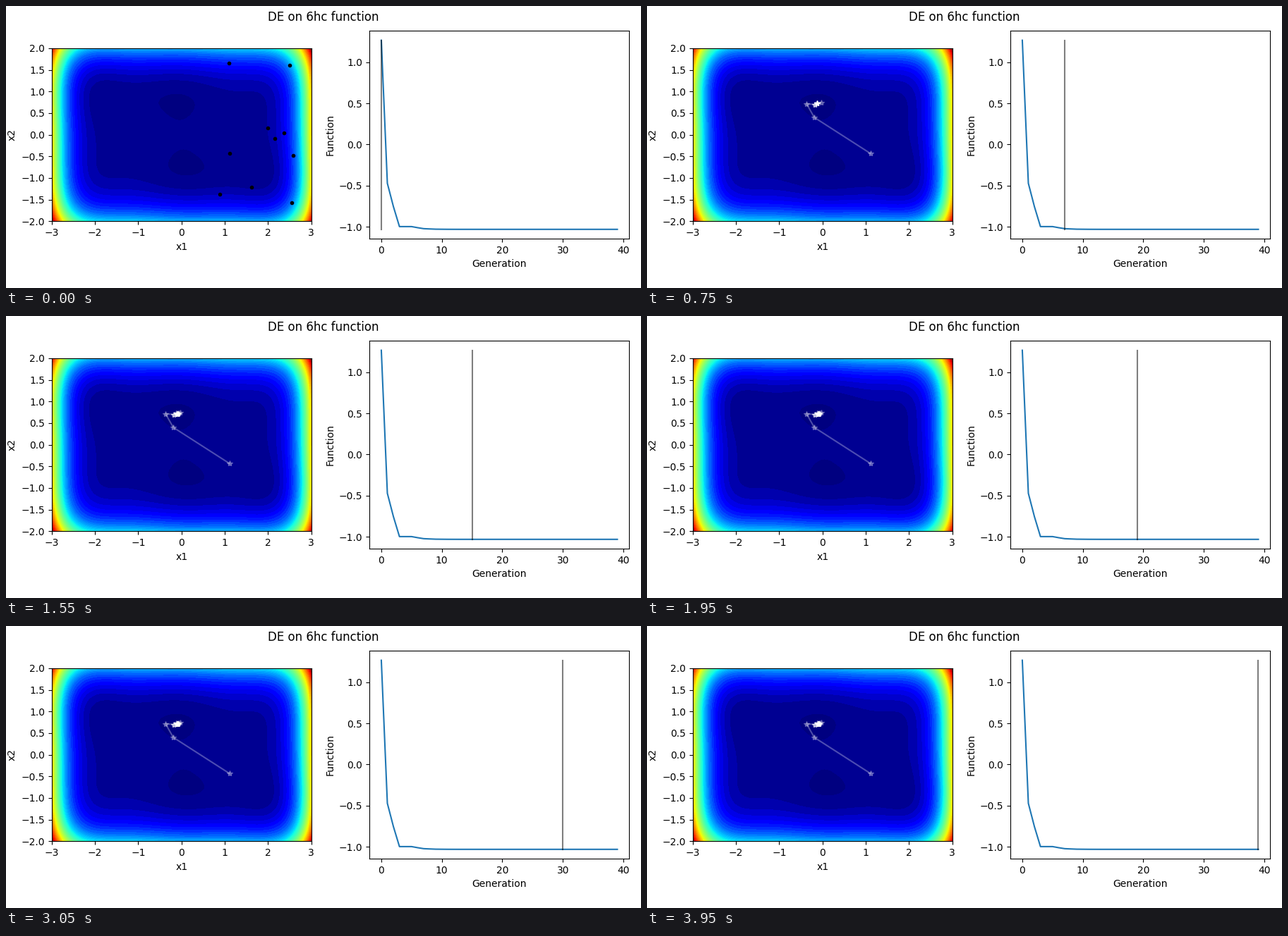
A matplotlib script for the animation above (4000 ms loop, 900 by 400 pixels).

```python
import numpy as np
import matplotlib.pyplot as plt
from matplotlib.animation import FuncAnimation
from matplotlib.colors import Normalize

W, H = 900, 400
GENS, SIZE = 40, 10
OPTIMUM = np.array([-0.0898, 0.7126])


def camel(x, y):
    return (4 - 2.1 * x**2 + x**4 / 3) * x**2 + x * y + (4 * y**2 - 4) * y**2


def best_points():
    """A few big jumps, a short rest, then a damped swing into the optimum."""
    jumps = [(1.11, -0.435), (-0.19, 0.40), (-0.37, 0.715)]
    rest = [(-0.18, 0.70)] * 3
    k = np.arange(GENS - len(jumps) - len(rest))
    swing = np.column_stack([0.055 * (-0.7) ** k, 0.028 * 0.7 ** k])
    return np.vstack([jumps, rest, OPTIMUM + swing])


best = best_points()
score = camel(*best.T)


def evolve():
    """Greedy search: a trial replaces a member only when it scores lower."""
    rng = np.random.default_rng(4)
    pool = rng.uniform(-1, 1, (8 * SIZE, 2)) * (2.67, 1.87)
    pool = pool[camel(*pool.T) > score[0]]
    pops = [np.vstack([best[:1], pool[:SIZE - 1]])]
    for g in range(1, GENS):
        pop = pops[-1].copy()
        reach = np.exp(-0.36 * g) * np.array([2.4, 0.8])
        trial = best[g] + reach * rng.uniform(-1, 1, pop.shape)
        new = camel(*trial.T)
        better = (new < camel(*pop.T)) & (new >= score[g])
        pop[better] = trial[better]
        pop[0] = best[g]
        pops.append(pop)
    return pops


pops = evolve()

fig = plt.figure(figsize=(W / 100, H / 100), dpi=100)
fig.suptitle("DE on 6hc function", y=0.982)


def add_axes(x, y, w, h):
    return fig.add_axes([x / W, y / H, w / W, h / H])


ax = add_axes(64.8, 94.75, 368, 368 * 2 / 3)
X, Y = np.meshgrid(np.linspace(-3, 3, 301), np.linspace(-2, 2, 201))
Z = camel(X, Y)
# Wide bands in the basin, finer ones up the slopes.
levels = np.r_[Z.min() - 0.01, np.arange(-0.4, 36, 4.2), np.arange(37.4, 166, 2.1)]
ax.contourf(X, Y, Z, levels, cmap="jet", norm=Normalize(Z.min(), Z.max()))
ax.set(xlabel="x1", ylabel="x2", xlim=(-3, 3), ylim=(-2, 2))
path, = ax.plot([], [], "w*-", alpha=0.3)
star, = ax.plot([], [], "w*")
dots, = ax.plot([], [], "k.")

curve = add_axes(515.2, 69.8, 368, 295)
curve.plot(score)
curve.set(xlabel="Generation", ylabel="Function")
cursor, = curve.plot([0, 0], [score.min(), score.max()], "k-", alpha=0.5)


def draw(i):
    # Even steps show the new population, odd steps move on to its best.
    g, show_best = divmod(i, 2)
    done = g + show_best
    path.set_data(*best[:done].T)
    star.set_data(*best[g:done].T)
    dots.set_data(*(pops[g][:0] if show_best else pops[g]).T)
    cursor.set_xdata([max(done - 1, 0)] * 2)
    return path, star, dots, cursor


anim = FuncAnimation(fig, draw, frames=2 * GENS, interval=50,
                     repeat=True, repeat_delay=0)
plt.show()
```
